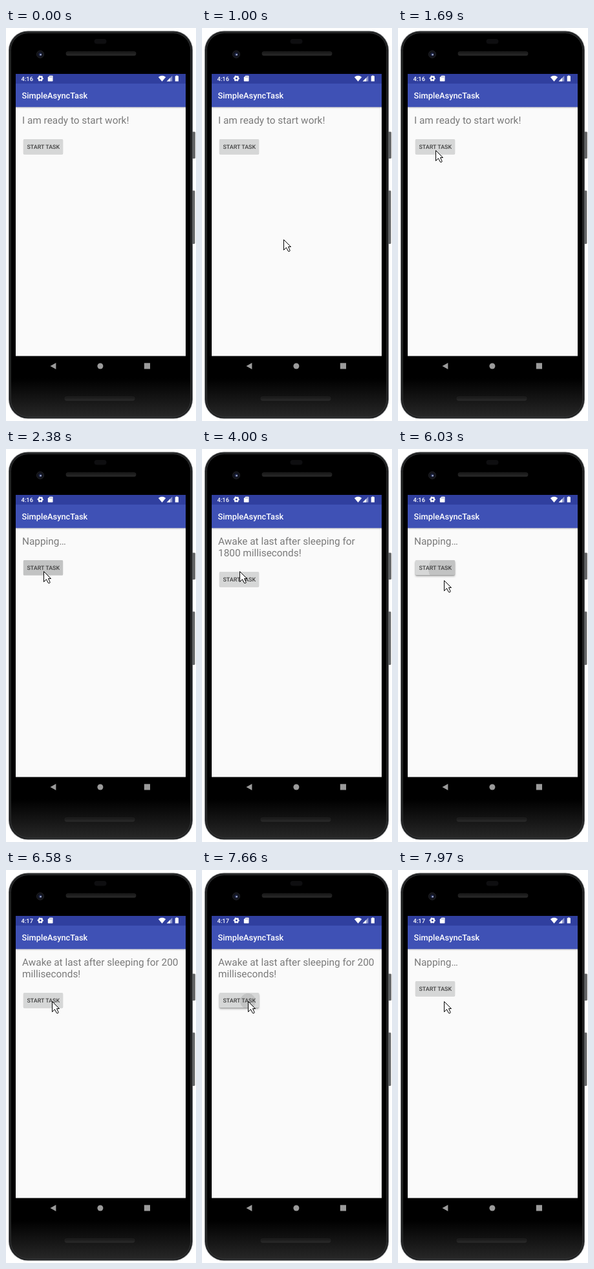
Recreate the animation shown at these times as an HTML page. Size 294 by 608 pixels, loop 8000 ms.

```html
<!DOCTYPE html>
<html lang="en">
<head>
<meta charset="utf-8">
<title>Async task demo</title>
<style>
  html, body { margin: 0; width: 100%; height: 100%; overflow: hidden; background: #fff; }
  svg { display: block; width: 294px; height: 608px; }
  text { font-family: Roboto, Arial, sans-serif; text-rendering: geometricPrecision; }
  .clock { font-size: 9.3px; font-weight: 500; fill: #fff; }
  .title { font-size: 12.8px; font-weight: 500; fill: #fff; }
  .msg { font-size: 15.36px; fill: #7a7a7a; }
  .label { font-size: 8.96px; font-weight: 500; fill: #434343; text-anchor: middle; }

  .ready, .nap, .long, .short, .early, .late, .button, .ripple, .lift {
    animation: 8s step-end infinite;
  }
  .ready { animation-name: ready; }
  .nap { animation-name: nap; }
  .long { animation-name: long; }
  .short { animation-name: short; }
  .early { animation-name: early; }
  .late { animation-name: late; }
  .button { animation-name: button; }
  .ripple { animation-name: ripple; }
  .lift { animation-name: lift; }
  .cursor { animation: cursor 8s linear infinite; }

  @keyframes ready { 0% { opacity: 1 } 27.8%, 100% { opacity: 0 } }
  @keyframes nap {
    0% { opacity: 0 } 27.8% { opacity: 1 } 49.98% { opacity: 0 }
    74.44% { opacity: 1 } 77.3% { opacity: 0 } 95.8%, 100% { opacity: 1 }
  }
  @keyframes long { 0% { opacity: 0 } 49.98% { opacity: 1 } 74.44%, 100% { opacity: 0 } }
  @keyframes short { 0% { opacity: 0 } 77.3% { opacity: 1 } 95.8%, 100% { opacity: 0 } }
  @keyframes early { 0% { opacity: 1 } 82.24%, 100% { opacity: 0 } }
  @keyframes late { 0% { opacity: 0 } 82.24%, 100% { opacity: 1 } }

  /* the second line of text pushes the button down */
  @keyframes button {
    0% { transform: none } 49.98% { transform: translateY(18px) }
    74.44% { transform: none } 77.3% { transform: translateY(18px) }
    95.8%, 100% { transform: none }
  }
  @keyframes ripple {
    0% { opacity: 0; transform: translate(58px, 189px) scale(1) }
    25.87% { opacity: 1; transform: translate(58px, 189px) scale(12) }
    26.84% { opacity: 1; transform: translate(58px, 189px) scale(24) }
    27.8% { opacity: 1; transform: translate(58px, 189px) scale(40) }
    28.77% { opacity: 1; transform: translate(58px, 189px) scale(70) }
    49.98% { opacity: 0; transform: translate(71px, 185px) scale(1) }
    73.48% { opacity: 1; transform: translate(71px, 185px) scale(12) }
    74.44% { opacity: 1; transform: translate(71px, 185px) scale(24) }
    75.4% { opacity: 1; transform: translate(71px, 185px) scale(40) }
    76.34% { opacity: 1; transform: translate(71px, 185px) scale(70) }
    77.3% { opacity: .5; transform: translate(71px, 185px) scale(70) }
    78.24% { opacity: 0; transform: translate(71px, 185px) scale(1) }
    94.86% { opacity: 1; transform: translate(71px, 185px) scale(12) }
    95.8% { opacity: 1; transform: translate(71px, 185px) scale(24) }
    96.74% { opacity: 1; transform: translate(71px, 185px) scale(70) }
    99.6%, 100% { opacity: 0; transform: translate(71px, 185px) scale(70) }
  }
  @keyframes lift {
    0% { opacity: 0 } 25.87% { opacity: 1 } 29.74% { opacity: 0 }
    73.48% { opacity: 1 } 77.3% { opacity: 0 }
    94.86% { opacity: 1 } 96.74%, 100% { opacity: 0 }
  }
  @keyframes cursor {
    0% { transform: translate(300px, 640px); animation-timing-function: step-end }
    5.74% { transform: translate(254px, 594px); animation-timing-function: steps(4) }
    9.54% { transform: translate(166px, 406px); animation-timing-function: steps(6) }
    15.24% { transform: translate(86px, 248px); animation-timing-function: steps(6) }
    21.1% { transform: translate(58px, 189px); animation-timing-function: step-end }
    63.8% { transform: translate(58px, 189px); animation-timing-function: steps(5) }
    68.48% { transform: translate(69px, 202px); animation-timing-function: step-end }
    73.48%, 100% { transform: translate(71px, 203px) }
  }
</style>
</head>
<body>
<svg viewBox="0 0 294 608">
  <defs>
    <clipPath id="face"><rect x="27" y="172" width="61" height="23" rx="1.3"/></clipPath>
    <filter id="soft" x="-20%" y="-40%" width="140%" height="180%"><feGaussianBlur stdDeviation="1.5"/></filter>
    <filter id="thin" x="-20%" y="-40%" width="140%" height="180%"><feGaussianBlur stdDeviation=".5"/></filter>
    <linearGradient id="key" x1="0" x2="1"><stop stop-color="#262728"/><stop offset=".6" stop-color="#77797b"/><stop offset="1" stop-color="#3a3b3c"/></linearGradient>
    <linearGradient id="slot" x1="0" x2="0" y1="0" y2="1"><stop stop-color="#161616"/><stop offset="1" stop-color="#2b2b2b"/></linearGradient>
    <linearGradient id="glass" x1="0" x2="0" y1="0" y2="1"><stop offset=".9"/><stop offset="1" stop-color="#272727"/></linearGradient>
    <linearGradient id="shade" x1="0" x2="0" y1="0" y2="1"><stop stop-opacity=".2"/><stop offset="1" stop-opacity="0"/></linearGradient>
  </defs>

  <!-- phone body -->
  <g fill="url(#key)">
    <rect x="288" y="160.5" width="4.8" height="41.5" rx="1.3"/>
    <rect x="288" y="251.5" width="4.3" height="82.5" rx="1.3"/>
  </g>
  <rect x="4" y="4.5" width="285" height="600" rx="30" fill="#606264"/>
  <rect x="5" y="5.4" width="283" height="598.2" rx="29" fill="#1b1c1d"/>
  <rect x="7.2" y="7.6" width="278.6" height="594" rx="27" fill="url(#glass)" stroke="#3c3d3e" stroke-width=".8"/>
  <rect x="136.5" y="17" width="19" height="7.4" rx="3.7" fill="#0e0e10"/>
  <g fill="url(#slot)" stroke="#262626" stroke-width=".7">
    <rect x="93" y="36.6" width="108" height="6" rx="2.5"/>
    <rect x="91" y="570.4" width="108" height="6" rx="2.5"/>
  </g>
  <circle cx="53" cy="40.7" r="5.6" fill="#121318" stroke="#25262c" stroke-width=".8"/>
  <circle cx="53" cy="40.7" r="2.8" fill="#1b2344"/>
  <circle cx="53.6" cy="41.3" r="1.2" fill="#b0b8d8"/>

  <!-- screen -->
  <rect x="15" y="71" width="263" height="436.5" fill="#fafafa"/>
  <rect x="15" y="122" width="263" height="3" fill="url(#shade)"/>
  <rect x="15" y="86" width="263" height="36.3" fill="#3f51b5"/>
  <rect x="15" y="71" width="263" height="15" fill="#303f9f"/>

  <!-- status bar -->
  <text class="clock early" x="23.6" y="82">4:16</text>
  <text class="clock late" x="23.6" y="82">4:17</text>
  <g fill="none" stroke="#fff">
    <circle cx="53.3" cy="78" r="2.6" stroke-width="2.2"/>
    <circle cx="53.3" cy="78" r="3.9" stroke-width="1.5" stroke-dasharray="2.2 1.884" stroke-dashoffset="1.1"/>
  </g>
  <path d="M67.4 73.8H71.7Q72.5 73.8 72.5 74.6V81.7Q72.5 82.5 71.7 82.5H65.6Q64.8 82.5 64.8 81.7V76.4Z" fill="#fff"/>
  <path d="M67.7 75v1.6M69.2 75v1.6M70.7 75v1.6" stroke="#303f9f" stroke-width=".5"/>
  <path d="M235.8 75.9Q241.5 71.7 247.2 75.9L241.5 82.7Z" fill="#fff"/>
  <path d="M257.3 73.8V82.4H248.7Z" fill="#8d96cb"/>
  <path d="M254.2 76.9V82.4H248.7Z" fill="#fff"/>
  <path d="M263.2 73.4h2.2v.9h1.5v8.2h-5.2v-8.2h1.5z" fill="#fff"/>

  <text class="title" x="24.6" y="108.6">SimpleAsyncTask</text>

  <!-- messages -->
  <text class="msg ready" x="25" y="148.3">I am ready to start work!</text>
  <text class="msg nap" x="25" y="148.3">Napping…</text>
  <g class="msg long">
    <text x="25" y="148.3">Awake at last after sleeping for</text>
    <text x="25" y="166.3">1800 milliseconds!</text>
  </g>
  <g class="msg short">
    <text x="25" y="148.3">Awake at last after sleeping for 200</text>
    <text x="25" y="166.3">milliseconds!</text>
  </g>

  <g class="button">
    <rect class="lift" x="27" y="174" width="61" height="23" rx="1.5" fill="#000" fill-opacity=".3" filter="url(#soft)"/>
    <rect x="26.8" y="172.4" width="61.4" height="23" rx="1.5" fill="#000" fill-opacity=".25" filter="url(#thin)"/>
    <rect x="27" y="172" width="61" height="23" rx="1.3" fill="#d6d7d7"/>
    <g clip-path="url(#face)"><circle class="ripple" r="1" fill="#000" fill-opacity=".09"/></g>
    <text class="label" x="57.8" y="186.7">START TASK</text>
  </g>

  <!-- navigation bar -->
  <g fill="#9b9b9b">
    <path d="M68.5 523L77.4 518V528Z"/>
    <circle cx="145.9" cy="523" r="4.5"/>
    <rect x="213.8" y="518.3" width="9.2" height="9.2"/>
  </g>

  <path class="cursor" d="M.5 .5V16.5L4.4 12.6L7.5 18.4H9.6L10.2 17.2L7.5 11.5H11.5Z" fill="#fff" stroke="#000"/>
</svg>
</body>
</html>
```
